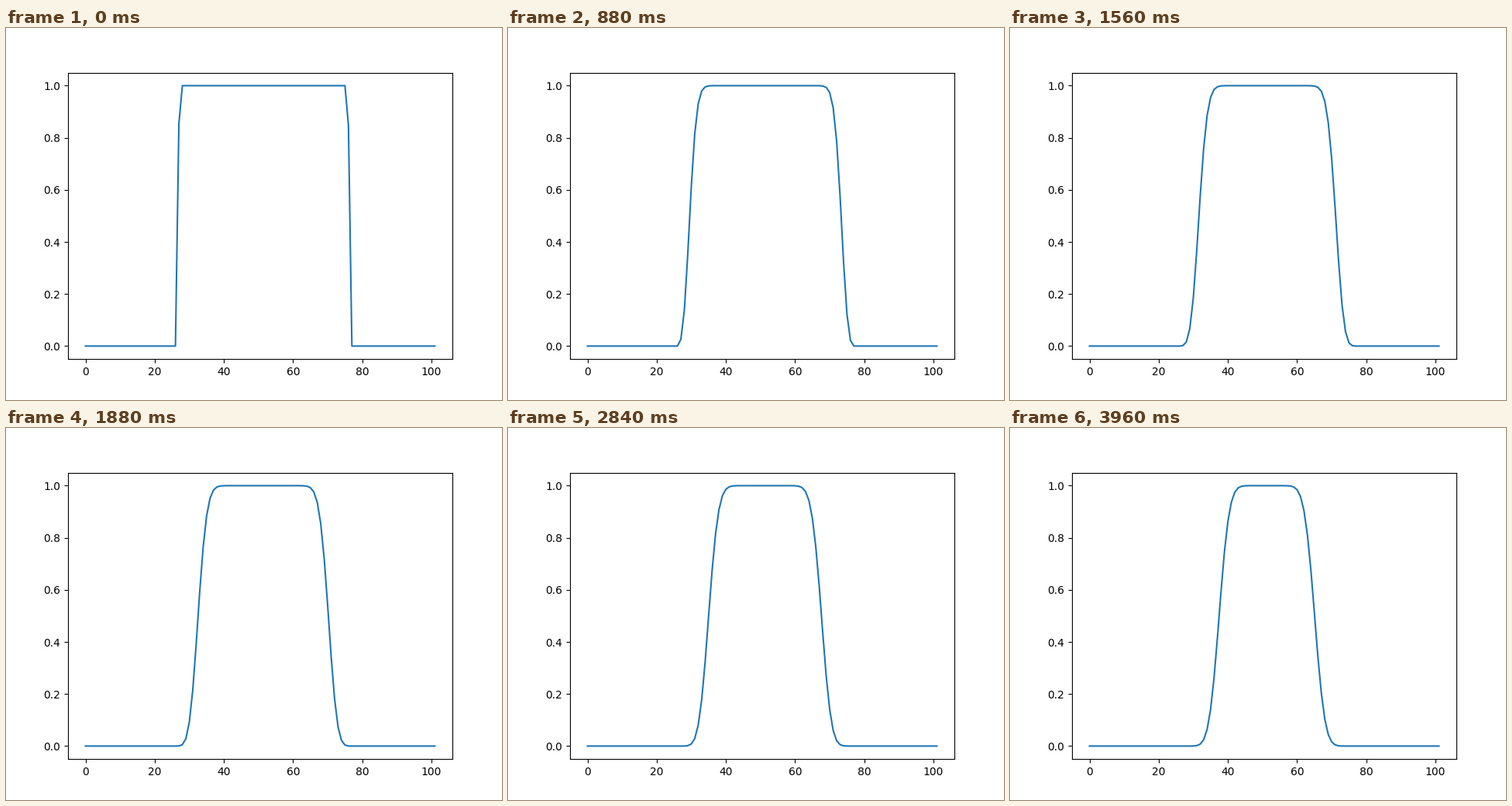
A matplotlib script for the animation above (4000 ms loop, 640 by 480 pixels).

```python
import numpy as np
import matplotlib.pyplot as plt
from matplotlib.animation import FuncAnimation

FRAMES = 100
INTERVAL = 40
CELLS = 102
CENTRE = 51
RATE = 0.0061

x = np.arange(CELLS)
courant = RATE * (CENTRE - x)  # flow converging on the centre


def step(u):
    """Advance the advection equation by one upwind step."""
    back = u - np.roll(u, 1)
    ahead = np.roll(u, -1) - u
    return u - np.maximum(courant, 0) * back - np.minimum(courant, 0) * ahead


def solve():
    u = np.where((x >= 27) & (x <= 76), 1.0, 0.0)
    states = []
    for _ in range(FRAMES):
        u = step(u)
        states.append(u)
    return states


states = solve()

fig, ax = plt.subplots(figsize=(6.4, 4.8), dpi=100)
line, = ax.plot(x, states[0], color="#1f77b4", lw=1.5)


def update(i):
    line.set_ydata(states[i])
    return line,


anim = FuncAnimation(fig, update, frames=FRAMES, interval=INTERVAL,
                     repeat=True, repeat_delay=0)
plt.show()
```
